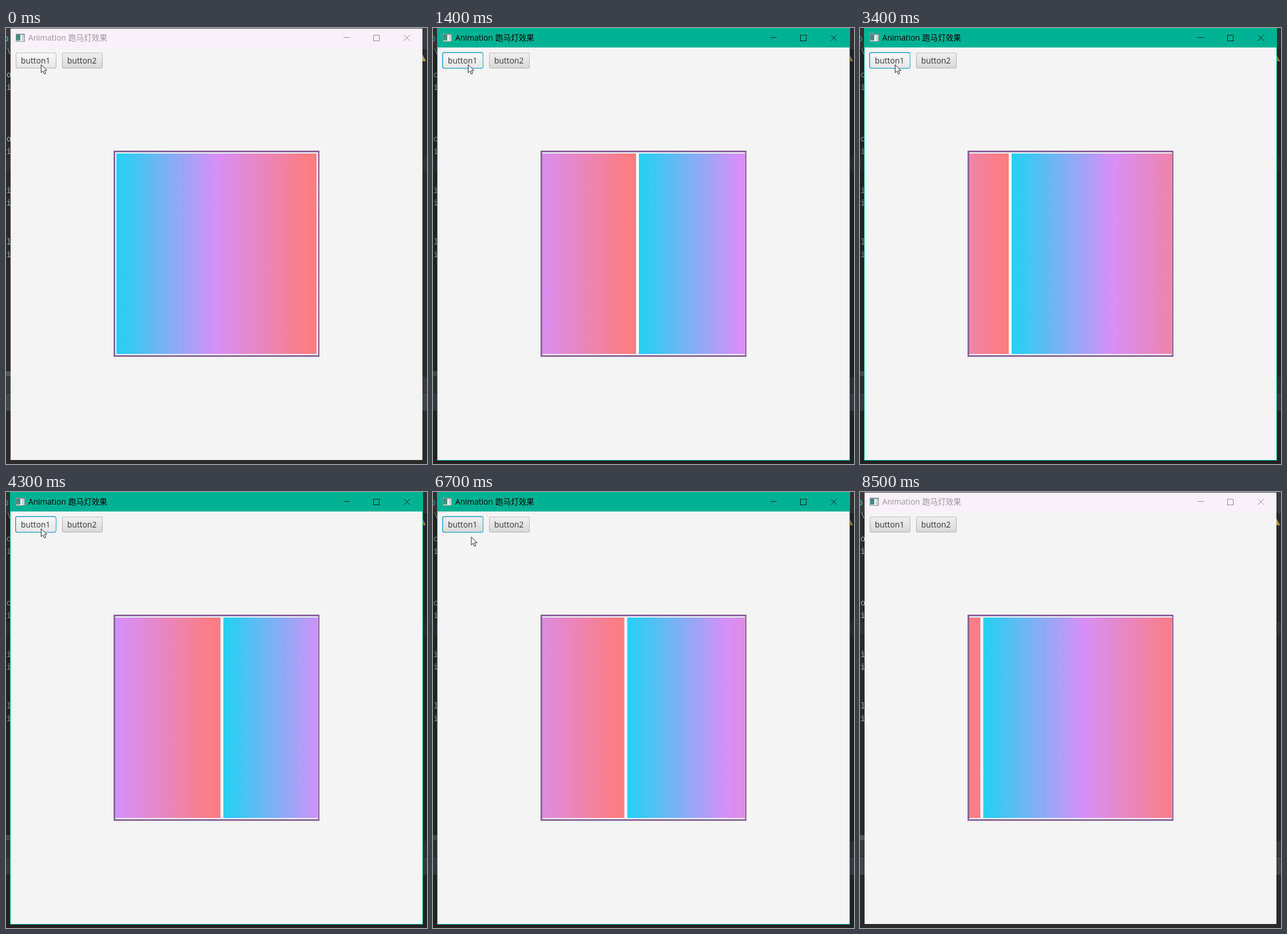
These frames come from a looping animation (736x761 px, 8.6 s). An HTML page with a canvas:

```html
<!DOCTYPE html>
<html lang="zh">
<head>
<meta charset="utf-8">
<title>Animation 跑马灯效果</title>
<style>
  html, body { margin: 0; width: 100%; height: 100%; overflow: hidden; background: #2a2a2b; }
  canvas { display: block; }
</style>
</head>
<body>
<canvas id="stage" width="736" height="761"></canvas>
<script>
const ctx = document.getElementById('stage').getContext('2d');
const LOOP = 8600, STEP = 100;
const ACTIVE_FROM = 100, ACTIVE_TO = 8400;
const TILE = 355;
const SANS = '"Open Sans", "Noto Sans", sans-serif';
const CJK = '"Noto Sans CJK SC", "Noto Sans CJK", "Noto Sans CJK JP", sans-serif';
const MONO = '"Noto Sans Mono", "DejaVu Sans Mono", monospace';

// [time, distance travelled by the strip]
const SCROLL = [[112, 0], [1400, 167], [3400, 427], [4300, 542], [5500, 699], [6700, 856.5], [8500, 1087.5], [8600, 1100]];
// [time, x, y] of the pointer tip
const POINTER = [[0, 61.5, 64], [6400, 61.5, 64], [6700, 67, 78.5], [7000, 76, 96], [7200, 88, 122], [7600, 190, 370], [8100, 325, 726], [8200, 345, 775]];

function track(keys, t, col) {
  if (t <= keys[0][0]) return keys[0][col];
  for (let i = 1; i < keys.length; i++) {
    const a = keys[i - 1], b = keys[i];
    if (t <= b[0]) return a[col] + (b[col] - a[col]) * (t - a[0]) / (b[0] - a[0]);
  }
  return keys[keys.length - 1][col];
}

function box(color, x, y, w, h) {
  ctx.fillStyle = color;
  ctx.fillRect(x, y, w, h);
}

function text(str, x, y, size, color, family = SANS) {
  ctx.font = size + 'px ' + family;
  ctx.fillStyle = color;
  ctx.fillText(str, x, y);
}

function path(points, closed) {
  ctx.beginPath();
  points.forEach(([x, y]) => ctx.lineTo(x, y));
  if (closed) ctx.closePath();
}

function round(x, y, w, h, r, fill) {
  ctx.beginPath();
  ctx.roundRect(x, y, w, h, r);
  ctx.fillStyle = fill;
  ctx.fill();
}

function shade(y0, y1, top, bottom) {
  const g = ctx.createLinearGradient(0, y0, 0, y1);
  g.addColorStop(0, top);
  g.addColorStop(1, bottom);
  return g;
}

function drawEditor(active) {
  box('#2a2a2b', 0, 0, 736, 761);
  box('#393c3e', 0, 0, 736, 37);
  box('#323233', 0, 227, 736, 22);
  box('#555657', 0, 599, 8, 9);
  box('#37393b', 0, 609, 736, 27);
  box('#424548', 0, 637, 736, 31);

  ctx.save();
  ctx.beginPath();
  ctx.rect(0, 0, 8, 761);
  ctx.clip();
  ctx.textAlign = 'right';
  const lines = { lo: [86, 198], ri: [108, 220, 310, 400], li: [288], Cl: [378] };
  for (const word in lines)
    for (const y of lines[word]) text(word, 9, y, 13.5, '#a9b0b8', MONO);
  text('"\\', 9, 46, 13.5, '#a9b0b8', MONO);
  ctx.restore();

  ctx.strokeStyle = '#35a99b';
  ctx.lineWidth = 2;
  ctx.beginPath();
  ctx.arc(-1, 19, 4, -1.5, 1.5);
  ctx.stroke();
  path([[728, 46], [734.5, 58], [724, 58]], true);
  ctx.fillStyle = '#b29443';
  ctx.fill();

  // the focused window casts a deeper shadow
  if (active) box('rgba(0,0,0,.2)', 0, 0, 736, 761);
}

function drawWindow(active) {
  const ink = active ? '#000' : '#999599';
  if (active) {
    box('#00b294', 7, 0, 722, 755);
    box('#f4f4f4', 8, 34, 720, 720);
  } else {
    box('#f4f4f4', 8, 1, 720, 753);
    box('#f9f1fa', 8, 1, 720, 35);
  }

  box('#8c9294', 17, 10, 16, 14);
  box('#f6f8f8', 18, 12, 14, 11);
  box(shade(12, 23, '#3f7f86', '#4c9c80'), 18, 12, 7, 10);
  box('#c9d2d2', 28, 12, 4, 11);

  text('Animation', 39, 22, 13.7, ink);
  text('跑马灯效果', 109, 22, 13.6, ink, CJK);

  ctx.strokeStyle = active ? '#06251f' : '#8f8b90';
  ctx.lineWidth = 1;
  path([[590, 16.5], [601, 16.5]]);
  ctx.stroke();
  ctx.strokeRect(642.5, 12.5, 10, 10);
  path([[695.5, 12], [706, 22.5]]);
  ctx.stroke();
  path([[706, 12], [695.5, 22.5]]);
  ctx.stroke();
}

function drawButton(label, x, hover, focus) {
  if (focus) {
    round(x - 1, 42, 72, 29, 4, '#239fc4');
    round(x + .5, 43.5, 69, 26, 2.5, '#dff0f6');
  } else {
    round(x, 43, 71, 27.5, 3, shade(43, 70, '#c0c0c0', '#acacac'));
  }
  const fill = hover ? shade(44, 69, '#f8f8f8', '#e6e6e6') : shade(44, 69, '#efefef', '#d9d9d9');
  round(x + 1, 44, 69, 25.5, 2, fill);
  text(label, x + 9, 62, 13.8, '#333');
}

function drawMarquee(shift) {
  box('#8c6699', 188, 214, 360, 360);
  box('#effcfd', 191, 217, 354.5, 354);
  ctx.save();
  ctx.beginPath();
  ctx.rect(191, 217, 354.5, 354);
  ctx.clip();
  const offset = shift % TILE;
  for (const x of [193 + offset - TILE, 193 + offset]) {
    const g = ctx.createLinearGradient(x, 0, x + 350, 0);
    g.addColorStop(0, '#28d0f3');
    g.addColorStop(.04, '#2fcdf3');
    g.addColorStop(.5, '#d78ff8');
    g.addColorStop(.95, '#fb7d85');
    g.addColorStop(1, '#fc7d83');
    box(g, x, 219, 350, 350);
  }
  ctx.restore();
}

function drawPointer(x, y) {
  ctx.save();
  ctx.translate(x, y);
  path([[0, 0], [0, 14], [3.2, 11], [5.4, 16.3], [7.9, 15.2], [5.7, 10.1], [10, 10]], true);
  ctx.fillStyle = '#fff';
  ctx.fill();
  ctx.strokeStyle = '#222';
  ctx.lineWidth = 1;
  ctx.stroke();
  ctx.restore();
}

function draw(t) {
  const active = t >= ACTIVE_FROM && t < ACTIVE_TO;
  const px = track(POINTER, t, 1), py = track(POINTER, t, 2);
  drawEditor(active);
  drawWindow(active);
  drawButton('button1', 17, py < 71, active);
  drawButton('button2', 98, false, false);
  drawMarquee(track(SCROLL, t, 1));
  drawPointer(px, py);
}

const start = performance.now();
function tick() {
  const t = (performance.now() - start) % LOOP;
  draw(Math.floor(t / STEP) * STEP);
  requestAnimationFrame(tick);
}
tick();
</script>
</body>
</html>
```
